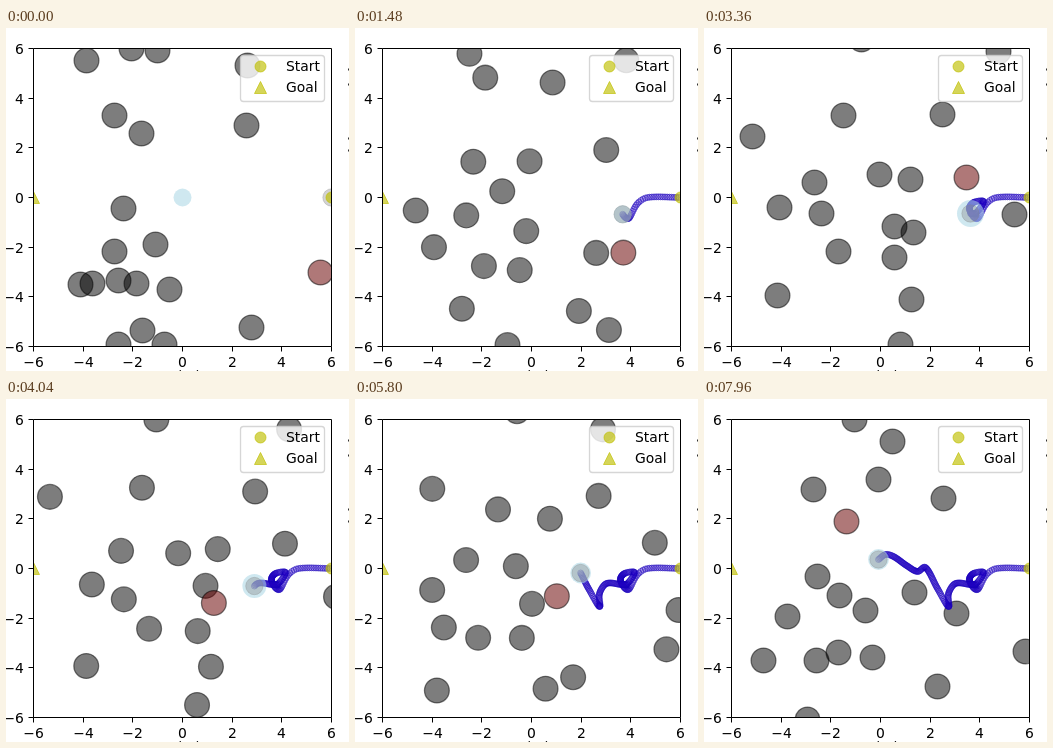
An HTML page with a canvas that plays this animation: 343x343 px, repeating every 8000 ms.

```html
<!DOCTYPE html>
<html lang="en">
<head>
<meta charset="utf-8">
<title>Crowd navigation</title>
<style>
  html, body { margin: 0; width: 100%; height: 100%; overflow: hidden; background: #fff; }
  canvas { display: block; width: 343px; height: 343px; }
</style>
</head>
<body>
<canvas id="stage"></canvas>
<script>
const LOOP = 8000, STEP = 40, MID = 3360, END = LOOP - STEP;
const LEFT = 27, TOP = 20, SIZE = 298, RIGHT = LEFT + SIZE, BOTTOM = TOP + SIZE;
const START = [RIGHT, 169], GOAL = [LEFT, 169], CENTRE = [176, 169];
const YELLOW = 'rgba(191,191,0,.65)';

// Small seeded generator, returns values from -1 to 1.
let seed = 7;
const random = () => (seed = seed * 16807 % 2147483647) / 1073741823.5 - 1;

// A walker goes from one point via another to a third, swaying on the way.
const walker = (from, via, to) => ({
  keys: [[0, ...from], [MID, ...via], [END, ...to]],
  sway: [14 * random(), 14 * random()]
});

const walkers = [
  walker([80, 32], [157, 11], [150, 20]),
  walker([125, 20], [139, 87], [142, 122]),
  walker([151, 22], [238, 86], [239, 99]),
  walker([241, 37], [294, 23], [188, 42]),
  walker([108, 87], [117, 185], [59, 261]),
  walker([135, 105], [206, 151], [174, 80]),
  walker([240, 97], [262, 149], [340, 127]),
  walker([117, 180], [175, 146], [135, 196]),
  walker([149, 216], [190, 198], [210, 193]),
  walker([108, 223], [110, 154], [113, 177]),
  walker([74, 256], [75, 179], [83, 217]),
  walker([86, 255], [48, 108], [109, 90]),
  walker([112, 252], [134, 223], [112, 261]),
  walker([130, 255], [190, 229], [134, 253]),
  walker([163, 261], [310, 186], [321, 252]),
  walker([245, 299], [207, 271], [233, 287]),
  walker([136, 302], [73, 267], [103, 320]),
  walker([112, 316], [196, 316], [168, 258]),
  walker([158, 316], [341, 285], [252, 214]),
  walker([314, 244], [209, 204], [161, 211])
];

// The robot's turning points: time, x, y.
const robotKeys = [
  [0, ...START], [600, 292, 169], [800, 282, 175], [1160, 273, 190],
  [1700, 265, 181], [2200, 269, 174], [2560, 279, 173], [2950, 272, 184],
  [MID, 266, 185], [3900, 251, 184], [4300, 244, 194], [4760, 244, 207],
  [5320, 233, 189], [6040, 221, 168], [6400, 213, 172], [6880, 202, 166],
  [7440, 189, 157], [7700, 181, 155], [END, 174, 160]
];

// Smooth cubic motion through timed points.
function glide(keys, t) {
  let i = 0;
  while (i < keys.length - 2 && t >= keys[i + 1][0]) i++;
  const a = keys[i], b = keys[i + 1], span = b[0] - a[0];
  const before = keys[i - 1] || a, after = keys[i + 2] || b;
  const k = (t - a[0]) / span;
  return [1, 2].map(j => {
    const slopeA = (b[j] - before[j]) / (b[0] - before[0]) * span;
    const slopeB = (after[j] - a[j]) / (after[0] - a[0]) * span;
    return a[j] + k * slopeA
      + k * k * (3 * (b[j] - a[j]) - 2 * slopeA - slopeB)
      + k * k * k * (2 * (a[j] - b[j]) + slopeA + slopeB);
  });
}

function walkerAt({ keys, sway }, t) {
  const k = t < MID ? t / MID : (t - MID) / (END - MID);
  const swing = Math.sin(2 * Math.PI * k);
  return glide(keys, t).map((v, j) => v + sway[j] * swing);
}

const canvas = document.getElementById('stage');
const ctx = canvas.getContext('2d');
const ratio = window.devicePixelRatio || 1;
canvas.width = canvas.height = Math.round(343 * ratio);
ctx.scale(ratio, ratio);
ctx.translate(.5, .5); // crisp one-pixel lines

function paint(fill, stroke, width = 1) {
  if (fill) { ctx.fillStyle = fill; ctx.fill(); }
  if (stroke) { ctx.strokeStyle = stroke; ctx.lineWidth = width; ctx.stroke(); }
}

function disc([x, y], r, fill, stroke, width) {
  ctx.beginPath();
  ctx.arc(x, y, r, 0, 2 * Math.PI);
  paint(fill, stroke, width);
}

function triangle([x, y]) {
  ctx.beginPath();
  ctx.moveTo(x, y - 6);
  ctx.lineTo(x - 6, y + 6);
  ctx.lineTo(x + 6, y + 6);
  ctx.closePath();
  paint(YELLOW, YELLOW);
}

function text(string, x, y, align) {
  ctx.font = '13.9px "DejaVu Sans", sans-serif';
  ctx.textAlign = align;
  ctx.fillStyle = '#000';
  ctx.fillText(string, x, y);
}

function drawScene(t) {
  const robot = glide(robotKeys, t);
  const spots = walkers.map(w => walkerAt(w, t));

  // The hazard is the walker closest to a point just ahead of the robot.
  const gaps = spots.map(([x, y]) => Math.hypot(x - robot[0] + 8, y - robot[1]));
  const hazard = gaps.indexOf(Math.min(...gaps));

  ctx.save();
  ctx.beginPath();
  ctx.rect(LEFT, TOP, SIZE, SIZE);
  ctx.clip();

  spots.forEach((spot, i) => {
    const fill = i === hazard ? 'rgba(104,0,0,.53)' : 'rgba(0,0,0,.51)';
    disc(spot, 12.4, fill, 'rgba(0,0,0,.5)', 1.3);
  });

  for (let s = STEP; s <= t; s += STEP)
    disc(glide(robotKeys, s), 3, 'rgba(40,0,200,.2)', 'rgba(25,0,185,.5)');

  // The halo rests at the centre until the robot's first step, then pulses.
  const pulse = 11.2 + 2.3 * Math.cos(2 * Math.PI * (t - MID) / 3520);
  disc(t ? robot : CENTRE, t ? pulse : 9, 'rgba(173,216,230,.58)');
  disc(robot, 8.7, 'rgba(128,128,128,.35)', 'rgba(128,128,128,.3)');
  disc(START, 5.5, YELLOW, YELLOW);
  triangle(GOAL);
  ctx.restore();
}

function drawAxes() {
  ctx.beginPath();
  ctx.rect(LEFT, TOP, SIZE, SIZE);
  for (let v = -6; v <= 6; v += 2) {
    const offset = Math.round((v + 6) * SIZE / 12);
    const x = LEFT + offset, y = BOTTOM - offset;
    ctx.moveTo(x, BOTTOM);
    ctx.lineTo(x, BOTTOM + 5);
    ctx.moveTo(LEFT, y);
    ctx.lineTo(LEFT - 5, y);
    const label = String(v).replace('-', '\u2212');
    text(label, x, 338.5, 'center');
    text(label, 17.4, y + 5.5, 'right');
  }
  paint(null, '#000');
  text('x (m)', CENTRE[0], 352.5, 'center');

  // Edge of the neighbouring plot's label.
  ctx.fillStyle = '#333';
  for (const y of [40, 55, 109, 121]) ctx.fillRect(341.5, y, 1, 2);
}

function drawLegend() {
  ctx.beginPath();
  ctx.roundRect(234, 27, 84, 46, 3);
  paint('rgba(255,255,255,.8)', 'rgba(204,204,204,.8)', 1.3);
  disc([254, 38], 5.5, YELLOW, YELLOW);
  triangle([254, 59]);
  text('Start', 279.5, 42.5, 'left');
  text('Goal', 279.5, 63.5, 'left');
}

function frame() {
  const t = Math.floor(performance.now() % LOOP / STEP) * STEP;
  ctx.fillStyle = '#fff';
  ctx.fillRect(-1, -1, 345, 345);
  drawScene(t);
  drawAxes();
  drawLegend();
  requestAnimationFrame(frame);
}
frame();
</script>
</body>
</html>
```
